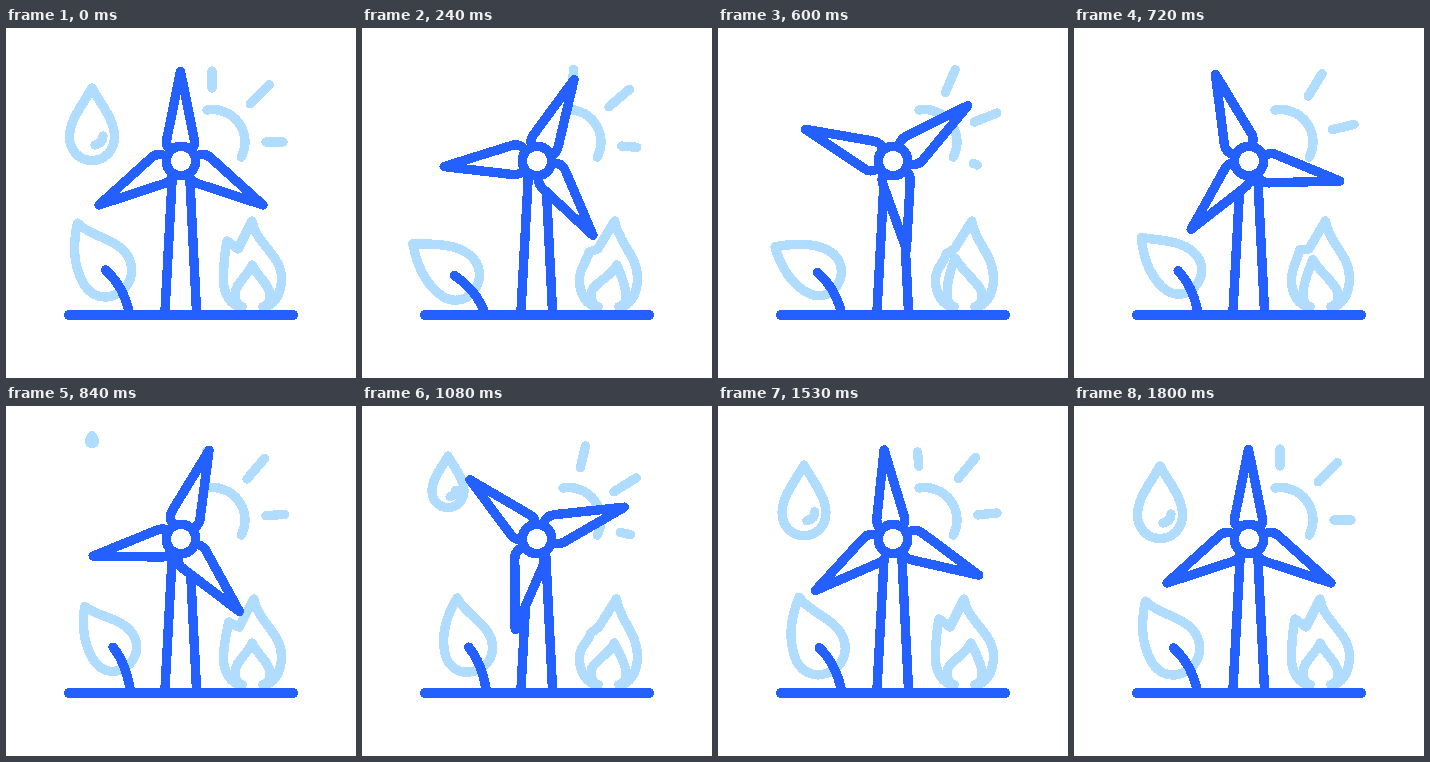
An HTML page for the animation above (1.91 s loop, 350 by 350 pixels).

```html
<!DOCTYPE html>
<html lang="en">
<head>
<meta charset="utf-8">
<title>Renewable energy</title>
<style>
  html, body { margin: 0; width: 100%; height: 100%; overflow: hidden; background: #fff; }
  svg { display: block; width: 100%; height: 100%; shape-rendering: crispEdges; }
  path, line, circle { fill: none; stroke-width: 9.4; stroke-linecap: round; stroke-linejoin: round; vector-effect: non-scaling-stroke; }
  .light { stroke: #b0dcff; }
  .blue { stroke: #245fff; }
  .solid { fill: #fff; }
</style>
</head>
<body>
<svg viewBox="0 0 350 350">
  <g class="light">
    <path d="M201 82A32.4 32.4 0 0 1 235.2 129"/>
    <g id="rays"></g>
    <g id="drop">
      <path d="M86 60C76 78 63.5 92 63.5 109C63.5 122 73 132.5 86 132.5C99 132.5 108.5 122 108.5 109C108.5 92 96 78 86 60Z"/>
      <path d="M97 108Q97 115 89 117"/>
    </g>
    <path id="leaf"/>
    <path id="flame"/>
    <path id="core"/>
  </g>
  <g class="blue">
    <path id="stem"/>
    <path d="M166.3 148L159 283M183.7 148L190.5 283"/>
    <g id="rotor">
      <path class="solid" d="M166 122Q159 119 161 110L174.5 43.5L188 110Q190 119 184 122"/>
      <path class="solid" id="blade" d="M190 128Q199 124 205 130L257 177L190 155Q184 152 183 146"/>
      <use href="#blade" transform="matrix(-1 0 0 1 350 0)"/>
    </g>
    <circle class="solid" cx="175" cy="133" r="14.8"/>
    <line x1="63" y1="287" x2="287" y2="287" style="stroke-width:10"/>
  </g>
</svg>
<script>
const LOOP = 1910, STEP = 30, END = 1800;
const $ = id => document.getElementById(id);
const clamp = x => Math.max(0, Math.min(1, x));
const smooth = x => x * x * (3 - 2 * x);
const mix = (a, b, p) => a + (b - a) * p;

// Half a sine wave from start, zero elsewhere.
const pulse = (t, start, length) => Math.sin(Math.PI * clamp((t - start) / length));

// From rest to the back pose, on to the front pose and home again.
function sway(t, tBack, tFront, rest, back, front) {
  if (t < tBack) return mix(rest, back, smooth(t / tBack));
  if (t < tFront) return mix(back, front, smooth((t - tBack) / (tFront - tBack)));
  return mix(front, rest, smooth((t - tFront) / (END - tFront)));
}

// Cubic bezier easing with y handles at 0 and 1.
function ease(x, x1, x2) {
  let lo = 0, hi = 1;
  for (let i = 0; i < 24; i++) {
    const s = (lo + hi) / 2, r = 1 - s;
    if (3 * x1 * s * r * r + 3 * x2 * s * s * r + s ** 3 < x) lo = s; else hi = s;
  }
  return smooth(lo);
}

const rays = Array.from({ length: 5 }, (_, i) => {
  const el = document.createElementNS('http://www.w3.org/2000/svg', 'line');
  $('rays').append(el);
  return { el, angle: -45 * i };
});

// Rays are longest on the diagonal and vanish behind the wheel and below.
function drawRays(t) {
  const turn = 90 * smooth(t / END);
  for (const { el, angle } of rays) {
    const a = angle + turn, len = 27 - 10 * ((a + 45) / 45) ** 2;
    el.style.display = len > 0 && a > -102 ? '' : 'none';
    el.setAttribute('x1', 54);
    el.setAttribute('x2', 54 + len);
    el.setAttribute('transform', `translate(206 114) rotate(${a})`);
  }
}

// The drop shrinks away, then grows down from above.
function drawDrop(t) {
  const leaving = t < 210, y = leaving ? 150 : 26;
  const s = leaving ? 1 - (t / 210) ** 2 : ease(clamp((t - 740) / (END - 740)), .22, 0);
  $('drop').style.display = s > .01 ? '' : 'none';
  $('drop').setAttribute('transform', `translate(86 ${y}) scale(${s}) translate(-86 ${-y})`);
}

function drawLeaf(t) {
  const x = sway(t, 300, 900, 98, 90, 106);
  const y = sway(t, 300, 900, 241, 247, 240);
  const angle = sway(t, 420, 1200, -30, -67, -8);
  const scale = 1 - .1 * pulse(t, 0, 1440);
  const bend = clamp((-30 - angle) / 35);
  const base = 123 + (x - 98) * .15;
  $('leaf').setAttribute('transform', `translate(${x} ${y}) rotate(${angle}) scale(${scale})`);
  $('leaf').setAttribute('d', `M0 -53C${4 + 10 * bend} ${-35 - 5 * bend} 27 -20 27 1
    C27 17 15 28 0 28C-16 28 -26 16 -25 0C-24 -22 -12 -40 0 -53Z`);
  $('stem').setAttribute('d', `M${x + 1.5} ${y + 1}Q${mix(x, base, .75)} ${y + 16} ${base} 283`);
}

function drawFlame(t) {
  const f = pulse(t, 0, 900) + pulse(t, 900, 460);
  const tip = 246 + 9 * f, sx = 221 + 8 * f, sy = 213 + 15 * f;
  const left = pulse(t, 420, 420);
  const ix = 246 + 9 * (pulse(t, 0, 420) - left + pulse(t, 840, 960)), iy = 237 - 7 * left;
  $('flame').setAttribute('d', `M257 278.5C268 278.5 275.5 266 275.5 250
    C275.5 227 ${tip + 4} 216 ${tip} 193L${232 + 5 * f} 221L${sx} ${sy}
    C${sx - 2} ${sy + 10} 217.5 239 217.5 252C217.5 266 225 278.5 236 278.5`);
  $('core').setAttribute('d', `M257 278.5C262 277 264.5 272 264 266
    C263 256 ${ix + 5} ${iy + 11} ${ix} ${iy}
    C${ix - 5} ${iy + 12} 229 256 229 266C229 272 231 277 236 278.5`);
}

function draw(now) {
  const t = Math.min(END, Math.floor((now % LOOP) / STEP) * STEP);
  $('rotor').setAttribute('transform', `rotate(${360 * ease(t / END, 1 / 3, .25)} 175 133)`);
  drawRays(t);
  drawDrop(t);
  drawLeaf(t);
  drawFlame(t);
}

function tick() {
  draw(performance.now());
  requestAnimationFrame(tick);
}
tick();
</script>
</body>
</html>
```
